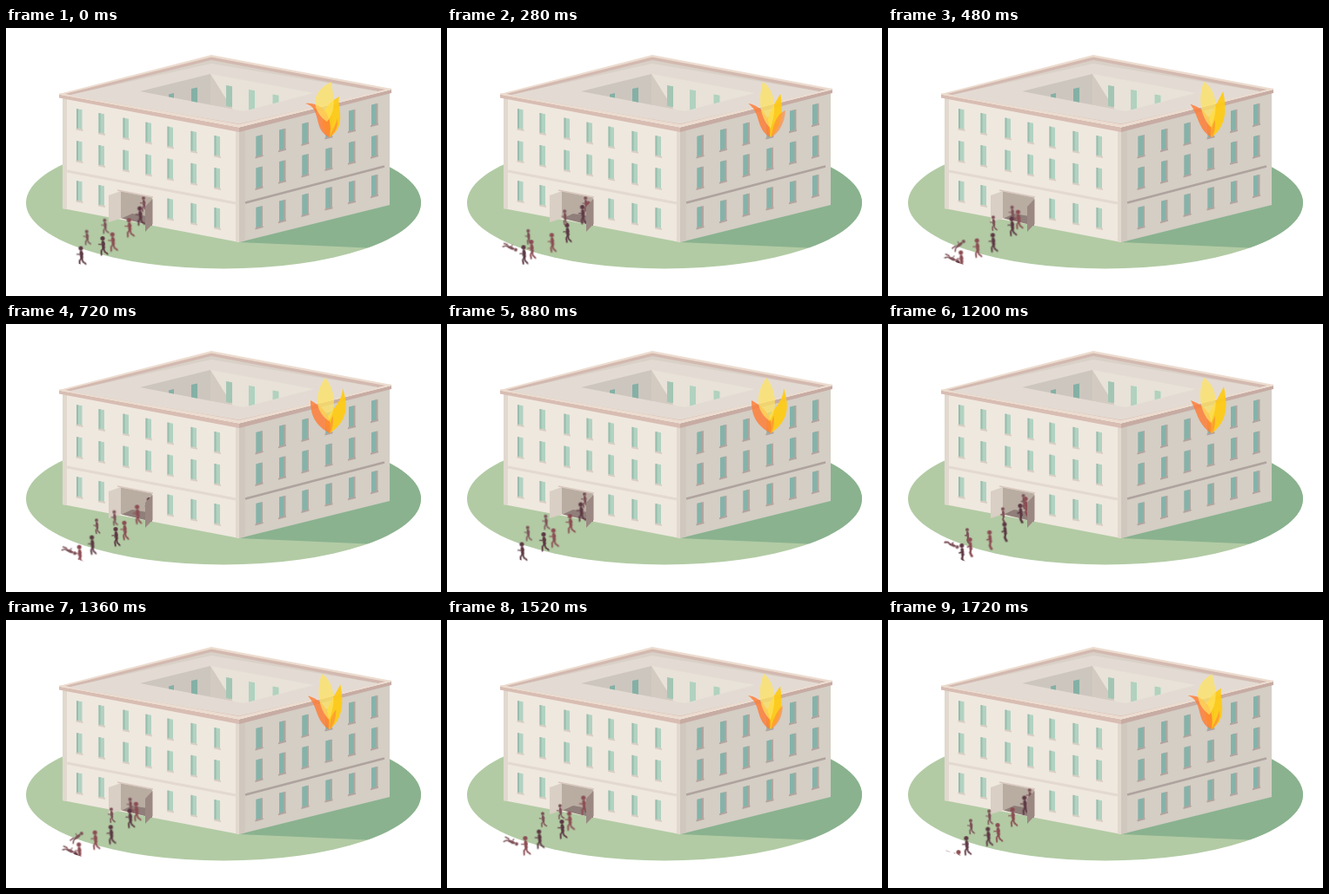
An HTML page that plays this animation: 500x309 px, repeating every 1.76 s.

```html
<!DOCTYPE html>
<html lang="en">
<head>
<meta charset="utf-8">
<title>Evacuation</title>
<style>
html, body { margin: 0; width: 100%; height: 100%; overflow: hidden; background: #fff; }
svg { display: block; width: 100%; height: 100%; }

/* Fire */
.flame path { animation: 880ms linear infinite alternate; }
.flame .pale { fill: #ffe45f; opacity: .72; animation-name: pale; }
.flame .left { fill: #ff7d36; opacity: .82; animation-name: left; }
.flame .right { fill: #ffcb12; opacity: .92; animation-name: right; }
.flame .side { fill: #ff8a3c; opacity: .65; animation-name: side; }
@keyframes pale {
  0% { d: path("M369 108C354 98 346 76 374 62C375 75 382 92 369 108"); }
  30% { d: path("M372 116C360 104 357 84 363 62C378 72 379 95 372 116"); }
  64% { d: path("M371 114C361 104 354 84 363 62C379 72 380 95 371 114"); }
  82%, 100% { d: path("M371 112C352 98 356 78 367 62C376 72 382 95 371 112"); }
}
@keyframes left {
  0% { d: path("M372 126C352 118 364 92 344 87C362 85 377 100 372 126"); }
  30% { d: path("M371 126C354 115 362 98 346 87C362 89 374 106 371 126"); }
  64% { d: path("M371 126C356 114 356 104 348 88C364 94 375 104 371 126"); }
  82%, 100% { d: path("M372 126C354 116 350 104 350 88C362 95 376 104 372 126"); }
}
@keyframes right {
  0% { d: path("M372 126C358 112 362 90 383 79C380 92 393 112 372 126"); }
  30% { d: path("M372 126C362 108 374 92 383 76C386 92 386 114 372 126"); }
  64% { d: path("M372 126C360 108 374 98 386 72C390 90 392 112 372 126"); }
  82%, 100% { d: path("M372 126C356 106 386 100 387 74C392 90 396 110 372 126"); }
}
@keyframes side {
  0%, 20% { d: path("M372 126C374 120 379 112 381 104C382 114 379 120 372 126"); }
  32% { d: path("M373 126C374 112 380 98 389 95C388 110 382 120 373 126"); }
  50%, 100% { d: path("M372 126C371 118 373 112 376 106C376 114 376 120 372 126"); }
}

/* Crowd */
.runner { fill: none; stroke-linecap: round; stroke-linejoin: round; animation: 1760ms linear infinite; }
.near { animation-name: near; }
.far { animation-name: far; }
.limb { animation: swing 220ms ease-in-out infinite alternate; }
.limb.back { animation-delay: -220ms; }
@keyframes swing { from { transform: rotate(24deg); } to { transform: rotate(-26deg); } }
@keyframes near {
  0%, 3.1% { transform: translate(165px, 211px) scale(1.2); opacity: 0; }
  3.2% { transform: translate(165px, 211px) scale(1.2); opacity: 1; }
  6.8% { transform: translate(158px, 210px) scale(1.2); }
  10.8% { transform: translate(156.5px, 214px) scale(1.2); }
  13.6% { transform: translate(152px, 218px) scale(1.2); }
  21.6% { transform: translate(143px, 227px) scale(1.2); }
  28.4% { transform: translate(138px, 236px) scale(1.2); }
  31.8% { transform: translate(132px, 241px) scale(1.2); }
  36.4% { transform: translate(126px, 245px) scale(1.2); }
  45.5% { transform: translate(111px, 251px) scale(1.2); }
  54.5% { transform: translate(97px, 255px) scale(1.2); }
  60.2% { transform: translate(90px, 260px) scale(1.2); }
  63.1% { transform: translate(85px, 263px) scale(1.2); }
  71.6% { transform: translate(81px, 276px) scale(1.2); }
  77.3%, 100% { transform: translate(78px, 292px) scale(1.2); opacity: 1; }
}
@keyframes far {
  0%, 7.9% { transform: translate(165px, 203px) scale(.95); opacity: 0; }
  8% { transform: translate(165px, 203px) scale(.95); opacity: 1; }
  11.4% { transform: translate(158px, 203px) scale(.95); }
  20.5% { transform: translate(145px, 212px) scale(.95); }
  29.5% { transform: translate(132px, 220px) scale(.95); }
  47.7% { transform: translate(110px, 230px) scale(.95); }
  52.3% { transform: translate(104px, 233px) scale(.95); }
  59.1% { transform: translate(95px, 238px) scale(.95); }
  63.1% { transform: translate(91px, 244px) scale(.95); }
  70.5% { transform: translate(84px, 249px) rotate(35deg) scale(.95); }
  77.3% { transform: translate(73px, 252.500px) rotate(118deg) scale(.95); }
  81.3% { transform: translate(74px, 255px) rotate(118deg) scale(.95); }
  85.8% { transform: translate(73px, 261px) rotate(118deg) scale(.95); }
  92.6% { transform: translate(74px, 271px) rotate(118deg) scale(.95); }
  97%, 100% { transform: translate(74px, 286px) rotate(118deg) scale(.95); opacity: 1; }
}
</style>
</head>
<body>
<svg viewBox="0 0 500 309">
  <defs>
    <clipPath id="lawn"><ellipse cx="250" cy="201.500" rx="227" ry="76"/></clipPath>
    <clipPath id="edge"><path d="M0 0H168V274H90L60 264 0 262Z"/></clipPath>
    <clipPath id="court"><path d="M154 73 235 53 354 75 273 96Z"/></clipPath>
  </defs>

  <g clip-path="url(#lawn)">
    <path fill="#b2cba4" d="M0 100H500V300H0Z"/>
    <path fill="#8ab28f" d="M268 247 415 253.500 500 256V120H430Z"/>
  </g>

  <!-- walls -->
  <path fill="#efe8df" d="M65 79 268 118V247L65 208Z"/>
  <path fill="#e1d8ce" d="M65 79 70 80V209L65 208ZM264 117 268 118V247L264 246Z"/>
  <path fill="#d4cec5" d="M268 118 441 74V204L268 247Z"/>
  <path fill="#d0c8be" d="M268 118 275 116V245.300L268 247Z"/>
  <path fill="none" stroke="#e3d9d0" stroke-width="3" d="M70 165 264 202"/>
  <path fill="none" stroke="#afa39e" stroke-width="2.500" d="M275 201.500 435 159.500"/>

  <!-- roof -->
  <path fill="#ecdccf" d="M61 76 236 31 443 70 268 114Z"/>
  <path fill="#d3b9b0" d="M68 76 236 33.500 436 71 268 111Z"/>
  <path fill="#d9d1c8" d="M72 78 236 37 430 73.500 268 110Z"/>
  <path fill="#e3dbd3" d="M72 77.500 236 41 430 73.500 268 110.500Z"/>
  <path fill="#d8bdb3" d="M61 76.500 268 114.500V120L61 80.500Z"/>
  <path fill="#c7aca3" d="M268 114.500 443 71V75L268 120Z"/>
  <path fill="none" stroke="#ecdccf" stroke-width="1.500" d="M61 76 268 113.700 443 70.300"/>

  <g clip-path="url(#court)">
    <path fill="#cdc6be" d="M150 50H235V100H150Z"/>
    <path fill="#e8e2d8" d="M235 50H360V100H235Z"/>
    <path fill="#d3cbc1" d="M235 53 262 96H235Z"/>
    <g id="courtWindows"></g>
  </g>

  <g id="windows"></g>

  <!-- entrance -->
  <path fill="#b9ada2" d="M131 188 168 195.500V227L131 219Z"/>
  <path fill="#8f7e79" d="M133 219.500 145 214 168 218V228Z"/>
  <path fill="#d9cfc4" d="M118 193 132 188V219.500L118 224Z"/>
  <path fill="none" stroke="#d9c8be" stroke-width="1.500" d="M128 187 169 195"/>

  <g id="crowd" clip-path="url(#edge)"></g>
  <path fill="#9b8882" d="M168.500 197V226L160 235V206Z"/>

  <g class="flame">
    <path class="right" d="M372 126C358 112 362 90 383 79C380 92 393 112 372 126"/>
    <path class="left" d="M372 126C352 118 364 92 344 87C362 85 377 100 372 126"/>
    <path class="side" d="M372 126C374 120 379 112 381 104C382 114 379 120 372 126"/>
    <path class="pale" d="M369 108C354 98 346 76 374 62C375 75 382 92 369 108"/>
  </g>
</svg>
<script>
const byId = id => document.getElementById(id);

// A parallelogram with vertical sides, starting at its top left corner.
const pane = (x, y, w, h, slope, fill) =>
  `<path fill="${fill}" d="M${x} ${y}l${w} ${w * slope}v${h}l${-w} ${-w * slope}z"/>`;

const leftWindow = (x, y) =>
  pane(x - 3.5, y, 6.5, 23, .195, '#b2d2c1') +
  pane(x - 3.5, y, 2, 23, .195, '#97bdae') +
  pane(x - 4, y + 22.5, 8, 2, .195, '#d9cec4');

const rightWindow = (x, y) =>
  pane(x - 3.5, y, 7.5, 23.5, -.27, '#b3a59e') +
  pane(x - 3.5, y, 5.5, 23.5, -.27, '#84b3aa') +
  pane(x - 4.5, y + 23.5, 9, 2, -.27, '#b3a39d');

const leftColumns = [84.5, 110, 138, 164, 189, 216, 243];
const rightColumns = [291, 317.5, 344, 371, 397.5, 423.5];
const nearDoor = x => x > 130 && x < 170;

let panes = '';
[93, 130, 176].forEach((top, row) => {
  for (const x of leftColumns)
    if (row < 2 || !nearDoor(x)) panes += leftWindow(x, top + (x - 84.5) * .195);
});
for (const top of [125, 161.5, 207])
  for (const x of rightColumns) panes += rightWindow(x, top - (x - 291) * .274);
byId('windows').innerHTML = panes;

byId('courtWindows').innerHTML =
  pane(187, 76.5, 6, 18, -.23, '#84b0a5') +
  pane(213, 70, 7, 18, -.23, '#84b0a5') +
  pane(253, 66, 7, 24, .19, '#a3c6b4') +
  pane(279, 71, 7, 24, .19, '#b0d2bf') +
  pane(306.5, 76.5, 7, 24, .19, '#b0d2bf');

const limb = (x, y, d, back) =>
  `<g transform="translate(${x} ${y})"><path class="limb${back ? ' back' : ''}" d="${d}"/></g>`;
const leg = 'M0 0L-.8 3.6 .9 7';
const arm = 'M0 0L.6 2.9 -2.6 4';

// start: the moment, in ms, when the runner steps into the doorway light
function runner(lane, start, color) {
  const phase = start - 200 - 3520;
  return [0, 880].map(shift => `
    <g class="runner ${lane}" stroke="${color}" style="animation-delay:${phase + shift}ms">
      <circle cy="-7" r="2.1" fill="${color}" stroke="none"/>
      <path stroke-width="2.7" d="M.3 -3.5L1 1.6"/>
      <g stroke-width="1.5">${limb(1, 2, leg)}${limb(1, 2, leg, true)}</g>
      <g stroke-width="1.1">${limb(.3, -4, arm, true)}${limb(.3, -4, arm)}</g>
    </g>`).join('');
}

const dark = '#5b3742', red = '#8b4c52', brown = '#7b4f56';
byId('crowd').innerHTML =
  runner('far', 0, brown) + runner('far', 290, brown) +
  runner('near', 280, dark) + runner('near', 400, red) +
  runner('near', 660, red) + runner('near', 860, dark);
</script>
</body>
</html>
```
